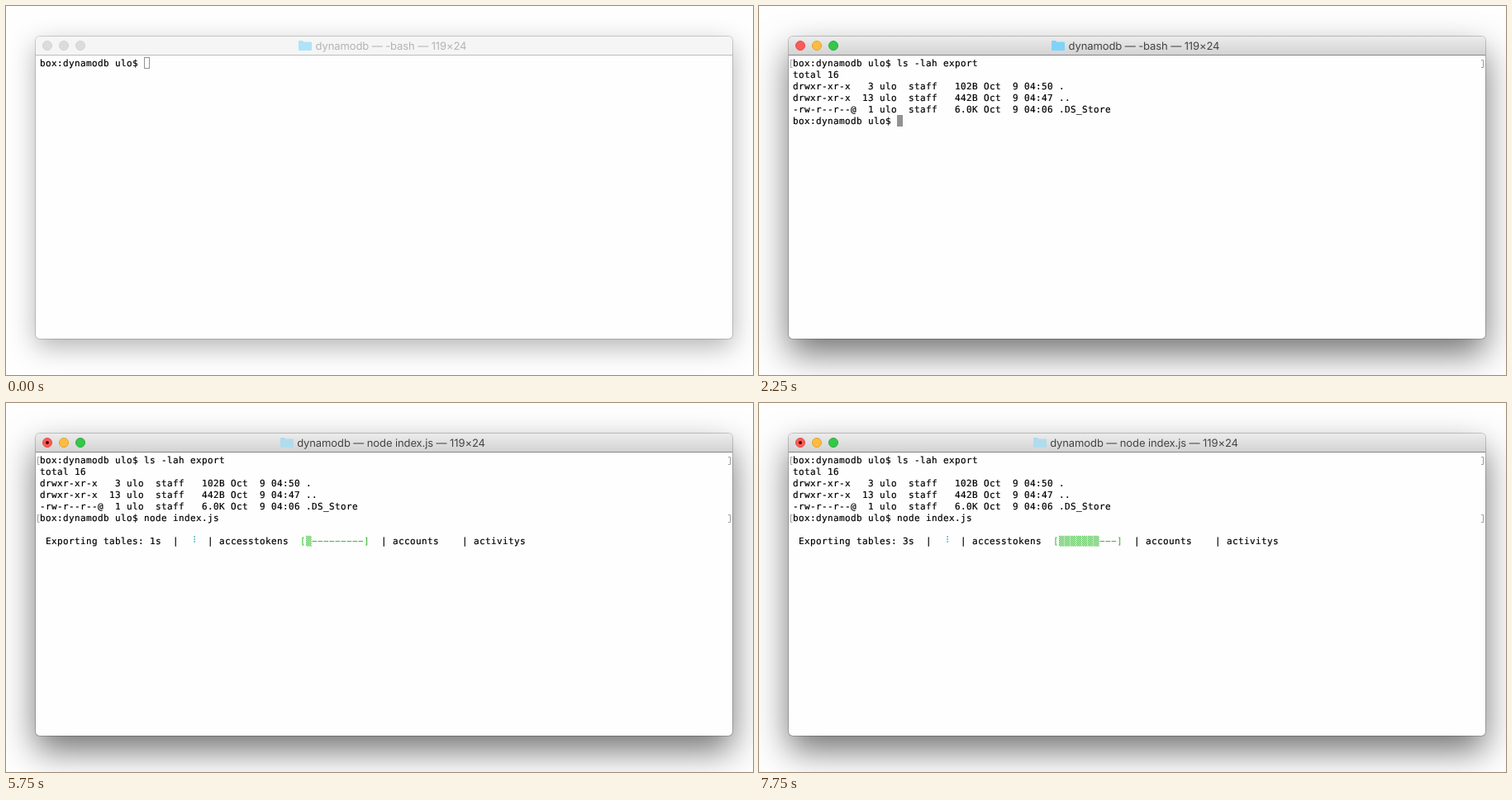
These frames come from a looping animation (904 by 447 pixels, 8000 ms). An HTML page:

```html
<!DOCTYPE html>
<html lang="en">
<head>
<meta charset="utf-8">
<title>Terminal</title>
<style>
  html, body { margin: 0; width: 100%; height: 100%; overflow: hidden; background: #fefefe; }
  #stage { position: relative; width: 904px; height: 447px; overflow: hidden; }
  #win {
    position: absolute; left: 36px; top: 37px; width: 843px; height: 366px;
    border-radius: 5px; overflow: hidden; background: #fefefe;
    box-shadow: 0 0 0 1px rgba(0,0,0,.2), 0 18px 42px rgba(0,0,0,.55);
  }
  #bar {
    height: 22px; border-bottom: 1px solid #868686;
    background: linear-gradient(#ececec, #d3d3d3);
  }
  .idle #win { box-shadow: 0 0 0 1px rgba(0,0,0,.17), 0 10px 32px rgba(0,0,0,.3); }
  .idle #bar { background: #f5f5f5; border-color: #bdbdbd; }

  svg { position: absolute; left: 0; top: 0; }
  text { text-rendering: geometricPrecision; white-space: pre; }
  #title { font: 13px Inter, sans-serif; letter-spacing: -.1px; text-anchor: middle; fill: #444; }
  #screen text { font: 11px "DejaVu Sans Mono", monospace; fill: #000; stroke: #000; stroke-width: .2px; }
  #screen .green { fill: #25b824; stroke: none; }
  .mark { fill: none; stroke: #a0a0a0; }
  .cursor { fill: #929292; }
  .dot { fill: #2fb8c4; }
  #folder { fill: #7fd3f8; }
  .red { fill: #fc5b57; stroke: #e24b45; }
  .amber { fill: #fdbc40; stroke: #e0a32e; }
  .lime { fill: #34c84a; stroke: #2aac3b; }
  #busy { fill: #4d0000; visibility: hidden; }

  .idle #title { fill: #b3b3b3; }
  .idle #folder { fill: #aee3fa; }
  .idle #lights circle { fill: #dcdcdc; stroke: #d2d2d2; }
  .idle .cursor { fill: none; stroke: #929292; }
  .running #folder { fill: #b0dcee; }
  .running #busy { visibility: visible; }
</style>
</head>
<body>
<div id="stage" class="idle">
  <div id="win"><div id="bar"></div></div>
  <svg width="904" height="447" xml:space="preserve">
    <g id="lights">
      <circle class="red" cx="50" cy="48" r="5.5"/>
      <circle class="amber" cx="70" cy="48" r="5.5"/>
      <circle class="lime" cx="90" cy="48" r="5.5"/>
    </g>
    <circle id="busy" cx="50" cy="48" r="2"/>
    <path id="folder" d="M0 1q0-1 1-1h4l1.5 1.5H15q1 0 1 1V11q0 1-1 1H1q-1 0-1-1z"/>
    <text id="title" x="466" y="53"></text>
    <g id="screen"></g>
  </svg>
</div>
<script>
const LOOP = 8000, TICK = 250;
const LEFT = 41, TOP = 62, CELL_W = 7, CELL_H = 14;
const PROMPT = 'box:dynamodb ulo$ ';

// [start time, value] pairs
const LIST_CMD = [[0, ''], [1000, 'l'], [1250, 'ls -'], [1500, 'ls -lah'],
                  [1750, 'ls -lah e'], [2000, 'ls -lah export']];
const NODE_CMD = [[2250, ''], [4000, 'node'], [4250, 'node i'], [4500, 'node index.js ']];
const FILLED = [[5500, 0], [5750, 1], [6250, 2], [6750, 4], [7250, 5], [7750, 7]];
const SECONDS = [[5500, 1], [6500, 2], [7500, 3]];
const SPINNER = '⠹⠸⠼⠴⠦⠇⠏⠋⠙⠸';
const LISTING = [
  'total 16',
  'drwxr-xr-x   3 ulo  staff   102B Oct  9 04:50 .',
  'drwxr-xr-x  13 ulo  staff   442B Oct  9 04:47 ..',
  '-rw-r--r--@  1 ulo  staff   6.0K Oct  9 04:06 .DS_Store'
];

const $ = id => document.getElementById(id);
const at = (keys, t) => keys.filter(k => k[0] <= t).pop()[1];
const colX = col => LEFT + col * CELL_W;
const rowY = row => TOP + row * CELL_H;

function write(row, col, str, cls = '') {
  const xs = [...str].map((_, i) => colX(col + i)).join(' ');
  return `<text class="${cls}" x="${xs}" y="${rowY(row) + 11}">${str}</text>`;
}

function cursor(row, col, hollow) {
  const d = hollow ? .5 : 0;
  return `<rect class="cursor" x="${colX(col) + d}" y="${rowY(row) + d}"
    width="${CELL_W - 2 * d}" height="${CELL_H - 2 * d}"/>`;
}

function marks(row) {
  const y = rowY(row) + 3.5;
  return `<path class="mark" d="M40.5 ${y}h-2v9h2M874 ${y}h2.5v9h-2.5"/>`;
}

// Braille bits 0-2 are the left column, 3-5 the right one
function spinner(row, col, glyph) {
  const bits = glyph.codePointAt(0) - 0x2800;
  let out = '';
  for (let i = 0; i < 6; i++) {
    if (!(bits >> i & 1)) continue;
    const x = colX(col) + (i < 3 ? 1.8 : 4.4), y = rowY(row) + 1.2 + i % 3 * 3;
    out += `<rect class="dot" x="${x}" y="${y}" width="1.6" height="1.6"/>`;
  }
  return out;
}

function progress(row, t) {
  const n = at(FILLED, t);
  const glyph = SPINNER[(t - 5500) / TICK];
  return write(row, 1, `Exporting tables: ${at(SECONDS, t)}s  |`)
    + spinner(row, 26, glyph)
    + write(row, 29, '| accesstokens')
    + write(row, 45, '[' + '▒'.repeat(n) + '−'.repeat(10 - n) + ']', 'green')
    + write(row, 59, '| accounts    | activitys');
}

function screen(t) {
  const first = PROMPT + at(LIST_CMD, t);
  let out = '';
  if (t < 2250) out += cursor(0, first.length, t < 500);
  out += write(0, 0, first);
  if (t >= 2000) out += marks(0);
  if (t >= 2250) {
    const second = PROMPT + at(NODE_CMD, t);
    LISTING.forEach((s, i) => out += write(i + 1, 0, s));
    if (t < 4750) out += cursor(5, second.length);
    out += write(5, 0, second);
  }
  if (t >= 4500) out += marks(5);
  if (t >= 4750 && t < 5500) out += cursor(6, 0);
  if (t >= 5500) out += progress(7, t);
  return out;
}

function render(t) {
  const running = t >= 5000;
  $('stage').className = t < 500 ? 'idle' : running ? 'running' : '';
  $('title').textContent = `dynamodb — ${running ? 'node index.js' : '-bash'} — 119×24`;
  $('folder').setAttribute('transform', `translate(${running ? 332 : 354} 42)`);
  $('screen').innerHTML = screen(t);
}

const start = performance.now();
let shown = -1;
function frame() {
  const t = Math.floor((performance.now() - start) % LOOP / TICK) * TICK;
  if (t !== shown) render(shown = t);
  requestAnimationFrame(frame);
}
frame();
</script>
</body>
</html>
```
